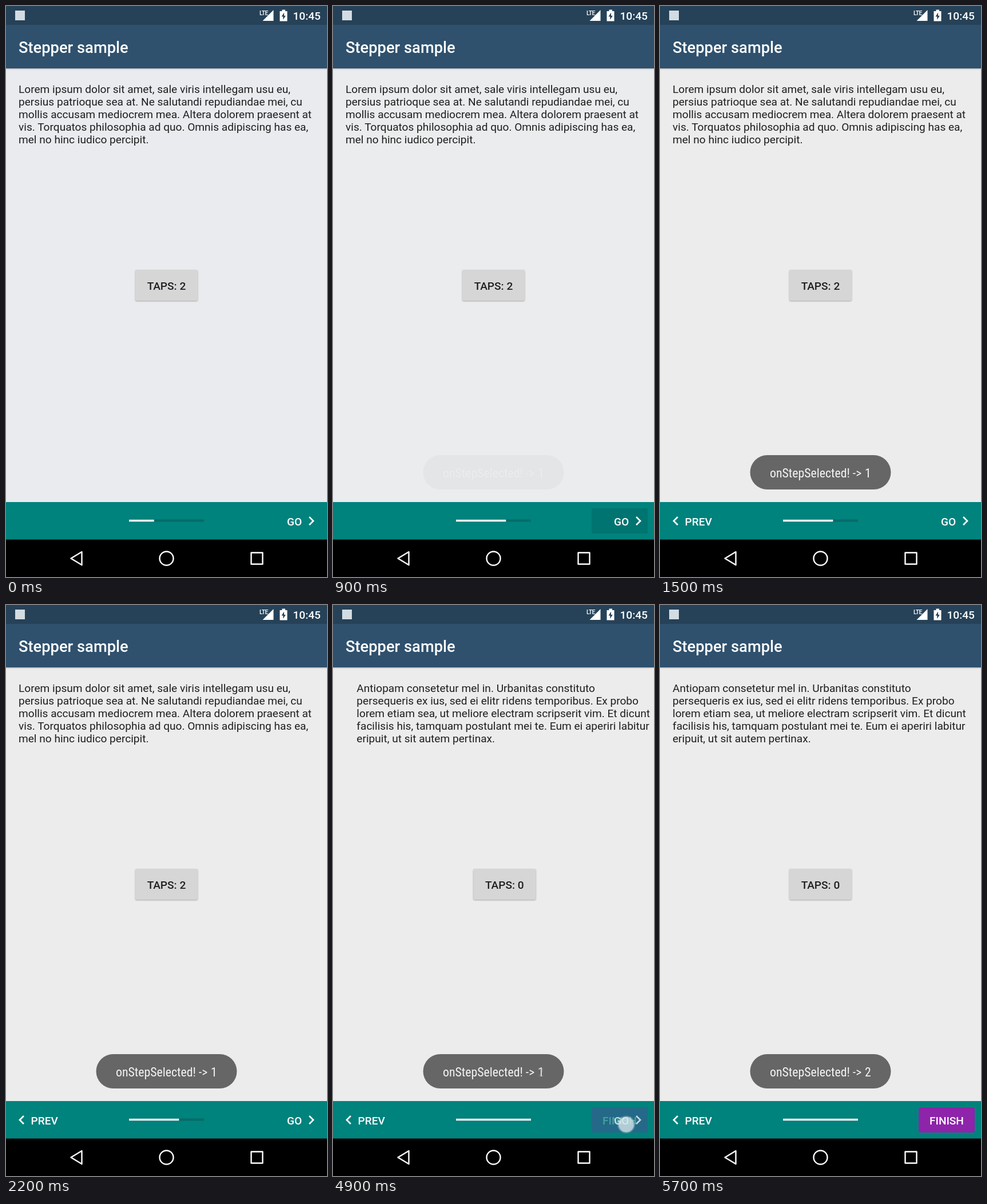
An HTML page for the animation above (8 s loop, 561 by 998 pixels).

```html
<!DOCTYPE html>
<html lang="en">
<head>
<meta charset="utf-8">
<title>Stepper sample</title>
<style>
  html, body { margin: 0; width: 100%; height: 100%; overflow: hidden; background: #000; }
  svg { display: block; width: 561px; height: 998px; font: 19.1px Roboto, sans-serif; }
  .medium { font-weight: 500; }
  .light { fill: #fff; }
  .dark { fill: #1f1f1f; }
  .line { fill: none; stroke: #fff; }
  .toast { font: 21.8px "Roboto Condensed", Roboto, sans-serif; font-stretch: 75%; fill: #f4f4f4; }
  .shadow { filter: drop-shadow(0 1.5px 1.2px rgba(0, 0, 0, .3)); }
  #prev, #toast, #two, #touch, #ripple, #finish { opacity: 0; }
</style>
</head>
<body>
<svg viewBox="0 0 561 998">
  <rect id="back" width="561" height="998" fill="#ececec"/>
  <g id="pages"></g>

  <g id="toast">
    <rect x="157.5" y="785" width="246" height="60" rx="30" fill="#666"/>
    <text class="toast" x="192" y="824">onStepSelected! -&gt;</text>
    <text class="toast" id="one" x="358" y="824">1</text>
    <text class="toast" id="two" x="358" y="824">2</text>
  </g>

  <g class="shadow">
    <rect y="33" width="561" height="76" fill="#2f516e"/>
  </g>
  <rect width="561" height="33" fill="#264258"/>
  <text class="light medium" x="22" y="81.5" font-size="27.3">Stepper sample</text>
  <rect x="16" y="8" width="17" height="17" fill="#d3dce2"/>
  <text class="light medium" x="443" y="15.5" font-size="10.5" style="font-stretch:75%" letter-spacing="-.8">LTE</text>
  <path class="light" d="M448.5 26L467.5 7V26Z"/>
  <path class="light" d="M482.5 6.5H488V9H491.5V26.5H478.5V9H482.5Z"/>
  <path d="M486 11.5L481.5 18.5H484.3V24L488.8 17H486Z" fill="#264258"/>
  <text class="light medium" x="501.5" y="24">10:45</text>

  <rect y="867" width="561" height="66" fill="#00827d"/>
  <rect x="215" y="897.5" width="131" height="4" fill="#086b68"/>
  <rect id="bar" x="215" y="897.5" width="131" height="4" fill="#fff"/>
  <g id="prev">
    <path class="line" d="M31 893L24 900L31 907" stroke-width="2.7"/>
    <text class="light medium" x="43.5" y="907.5">PREV</text>
  </g>
  <rect id="ripple" x="452" y="878" width="98" height="44" rx="2.5"/>
  <g id="finish">
    <rect x="452" y="878" width="98" height="44" rx="2.5" fill="#8e24aa"/>
    <text class="light medium" x="471" y="907.5">FINISH</text>
  </g>
  <g id="go">
    <text class="light medium" x="491" y="907.5">GO</text>
    <path class="line" d="M530 893L537 900L530 907" stroke-width="2.7"/>
  </g>

  <rect y="932.5" width="561" height="66"/>
  <g class="line" stroke-width="2.4" stroke-linejoin="round">
    <path d="M132.5 954V977L113.5 965.5Z"/>
    <circle cx="280.5" cy="965.5" r="12"/>
    <rect x="428.5" y="955.5" width="20" height="20"/>
  </g>

  <g id="touch">
    <circle r="15.5" fill="#fff" opacity=".22"/>
    <circle r="13.5" fill="#d6e6ea" opacity=".72"/>
  </g>
</svg>
<script>
const LOOP = 8000, STEP = 100, WIDTH = 561;
const $ = id => document.getElementById(id);

const lorem = [
  'Lorem ipsum dolor sit amet, sale viris intellegam usu eu,',
  'persius patrioque sea at. Ne salutandi repudiandae mei, cu',
  'mollis accusam mediocrem mea. Altera dolorem praesent at',
  'vis. Torquatos philosophia ad quo. Omnis adipiscing has ea,',
  'mel no hinc iudico percipit.'
];
const antiopam = [
  'Antiopam consetetur mel in. Urbanitas constituto',
  'persequeris ex ius, sed ei elitr ridens temporibus. Ex probo',
  'lorem etiam sea, ut meliore electram scripserit vim. Et dicunt',
  'facilisis his, tamquam postulant mei te. Eum ei aperiri labitur',
  'eripuit, ut sit autem pertinax.'
];

const page = (lines, taps, i) => `<g transform="translate(${i * WIDTH})">
  ${lines.map((s, n) => `<text class="dark" x="22" y="${151.5 + n * 22.2}">${s}</text>`).join('')}
  <rect class="shadow" x="226" y="461" width="109" height="54" rx="2.7" fill="#d6d6d6"/>
  <text class="dark medium" x="280.5" y="495.5" text-anchor="middle">TAPS: ${taps}</text></g>`;
$('pages').innerHTML = page(lorem, 2, 0) + page(lorem, 2, 1) + page(antiopam, 0, 2);

// Each [time, value] holds until the next one.
function play(id, prop, steps) {
  const frames = steps.map(([time, value]) =>
    ({ offset: time / LOOP, [prop]: value, easing: 'steps(1, end)' }));
  frames.push({ offset: 1, [prop]: steps.at(-1)[1] });
  $(id).animate(frames, { duration: LOOP, iterations: Infinity }).startTime = start;
}

// Samples an eased change at the stage's step rate.
function tween(from, to, begin, length, ease) {
  const steps = [];
  for (let t = Math.ceil(begin / STEP) * STEP; t < begin + length + STEP; t += STEP) {
    const k = ease(Math.min(1, (t - begin) / length));
    steps.push([t, from + (to - from) * k]);
  }
  return steps;
}
const linear = k => k;
const smooth = k => (1 - Math.cos(Math.PI * k)) / 2;
const quint = k => 1 - (1 - k) ** 5;
const start = document.timeline.currentTime ?? performance.now();

play('pages', 'transform', [[0, 0],
  ...tween(0, -WIDTH, 698, 200, quint),
  ...tween(-WIDTH, -2 * WIDTH, 4802, 200, quint)
].map(([t, x]) => [t, `translateX(${x}px)`]));
play('bar', 'clipPath', [[0, 87.3], [700, 43.7], [4900, 0]]
  .map(([t, x]) => [t, `inset(0 ${x}px 0 0)`]));
play('back', 'fill', [[0, '#eaebef'], [600, '#ebeced'], [1400, '#ececec']]);
play('prev', 'opacity', [[0, 0], ...tween(0, 1, 900, 300, smooth)]);
play('toast', 'opacity', [[0, 0], ...tween(0, 1, 880, 400, linear)]);
play('one', 'opacity', [[0, 1], ...tween(1, 0, 4860, 300, linear)]);
play('two', 'opacity', [[0, 0], ...tween(0, 1, 4860, 300, linear)]);
play('go', 'opacity', [[0, 1], ...tween(1, 0, 4797, 300, smooth)]);
play('finish', 'opacity', [[0, 0], ...tween(0, 1, 4797, 300, smooth)]);
play('ripple', 'opacity', [[0, 0], [800, .06], [900, .1], [1100, .07], [1200, .03], [1300, 0]]);
play('touch', 'opacity', [[0, 0], [500, 1], [800, 0], [4600, 1], [5000, 0]]);
play('touch', 'transform', [[0, 'translate(513px, 897px)'], [4600, 'translate(512.5px, 908px)']]);
</script>
</body>
</html>
```
